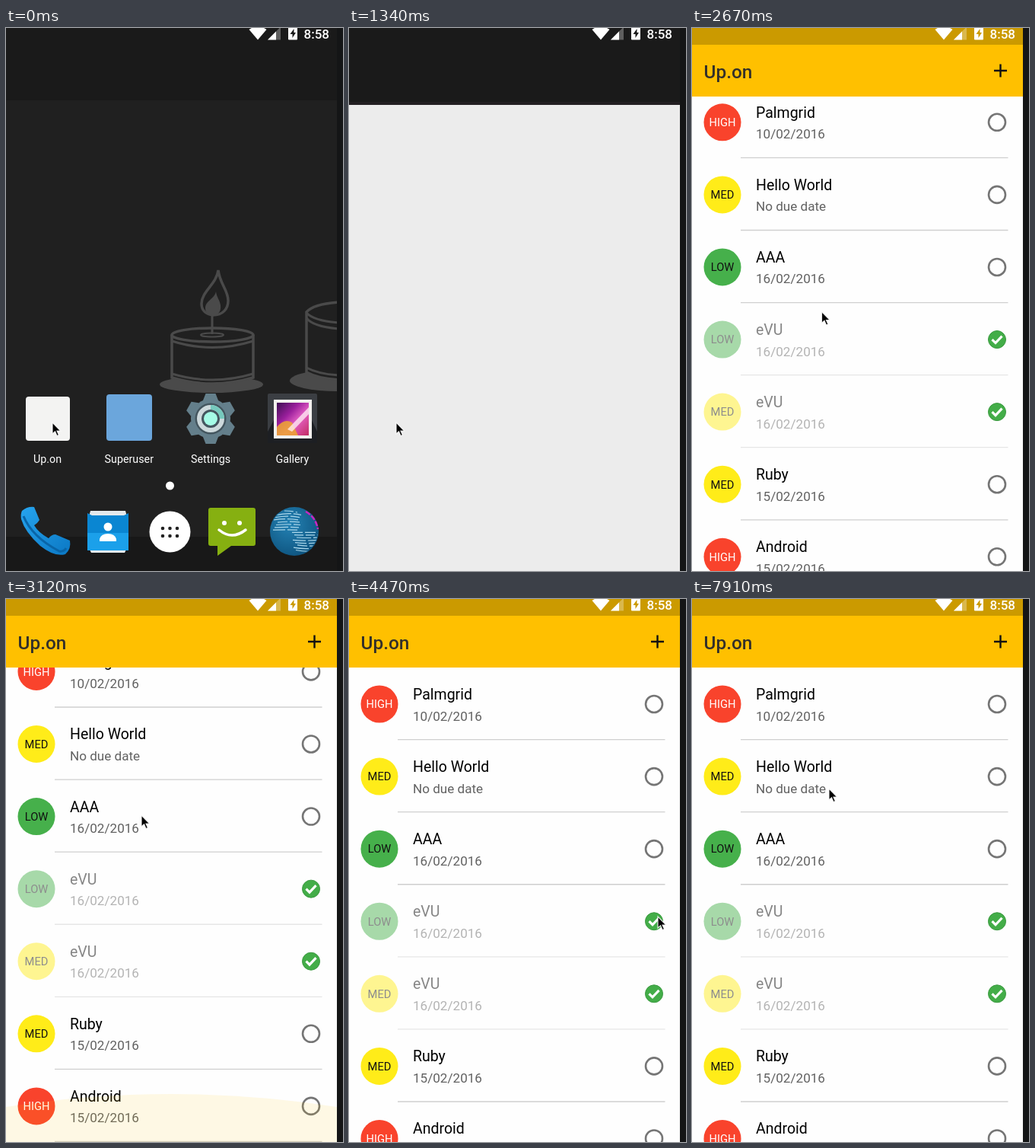
Recreate the animation shown at these times as an HTML page. Size 443 by 713 pixels, loop 8000 ms.

```html
<!DOCTYPE html>
<html lang="en">
<head>
<meta charset="utf-8">
<title>Task list</title>
<style>
html, body { margin: 0; width: 100%; height: 100%; overflow: hidden; background: #141516; }
svg { display: block; width: 443px; height: 713px; }
text { font-family: Roboto, sans-serif; }
</style>
</head>
<body>
<svg viewBox="0 0 443 713" xmlns="http://www.w3.org/2000/svg">
  <defs>
    <clipPath id="screen"><rect width="435" height="713"/></clipPath>
    <clipPath id="listClip"><rect y="90" width="435" height="623"/></clipPath>
    <clipPath id="globeClip"><circle cx="379" cy="661" r="31"/></clipPath>
    <linearGradient id="photo" x1="0" y1="0" x2="1" y2="1">
      <stop offset="0" stop-color="#3d0f52"/><stop offset=".35" stop-color="#9a1f9c"/>
      <stop offset=".6" stop-color="#e45fc4"/><stop offset="1" stop-color="#c22d63"/>
    </linearGradient>
    <linearGradient id="handset" x1="0" y1="0" x2="1" y2="1">
      <stop offset="0" stop-color="#26a4ee"/><stop offset="1" stop-color="#0b78c4"/>
    </linearGradient>
    <radialGradient id="globe" cx=".4" cy=".35" r=".7">
      <stop offset="0" stop-color="#2482b4"/><stop offset="1" stop-color="#0e547f"/>
    </radialGradient>
  </defs>

  <rect width="443" height="713" fill="#141516"/>
  <g clip-path="url(#screen)">
    <g id="home">
      <rect width="435" height="713" fill="#1a1a1a"/>
      <rect y="95" width="435" height="573" fill="#202020"/>
      <rect y="668" width="435" height="45" fill="#181818"/>
      <g fill="none" stroke="#4a4a4a" stroke-width="3.500">
        <ellipse cx="270" cy="468" rx="68" ry="11" fill="#4a4a4a" stroke="none"/>
        <path d="M218 403V459Q271 475 325 459V403" fill="#202020"/>
        <ellipse cx="271.500" cy="403" rx="53.500" ry="9" fill="#202020"/>
        <path d="M218 411Q271 428 325 411M218 454Q271 470 325 454" stroke-width="3"/>
        <ellipse cx="271" cy="403" rx="15" ry="2.500" stroke-width="2"/>
        <path d="M271 402V376" stroke-width="3"/>
        <path d="M279 318C277 336 257 346 257 362C257 371 263 376 272 377C285 377 292 369 292 358C292 344 281 336 279 318Z"/>
        <path d="M276 346C274 356 262 358 262 368C262 374 266 377 272 377C280 377 283 371 282 364C281 357 277 354 276 346Z" fill="#4a4a4a" stroke="none"/>
        <ellipse cx="436" cy="463" rx="63" ry="14" fill="#4a4a4a" stroke="none"/>
        <path d="M395 373V452Q412 461 440 462V360Q405 362 395 373Z" fill="#202020"/>
        <path d="M395 374Q405 385 440 387M395 381Q405 393 440 395M395 446Q412 455 440 456" stroke-width="3"/>
      </g>

      <rect x="26" y="484" width="58" height="58" rx="4" fill="#f3f3f2"/>
      <rect x="132" y="481" width="60" height="61" rx="4" fill="#6ba6dc"/>

      <g transform="translate(269 513)">
        <g id="gear" fill="#647f8b"><circle r="26"/></g>
        <circle r="20.500" fill="#44565f"/>
        <circle r="15" fill="none" stroke="#cdd9dc" stroke-width="6"/>
        <path d="M0 -15A15 15 0 0 1 15 0" fill="none" stroke="#76c9bd" stroke-width="6"/>
        <circle r="9" fill="#a5fbe6"/>
      </g>

      <rect x="344" y="480" width="65" height="65" rx="2" fill="#3b3e43"/>
      <path d="M344 545V530L352 515H402L409 530V545Z" fill="#1d1f23"/>
      <rect x="352" y="488" width="50" height="51" fill="#f3f1ee"/>
      <rect x="356" y="492" width="42" height="43" fill="url(#photo)"/>
      <path d="M356 535V524Q366 512 376 518L384 535Z" fill="#efa72f" opacity=".85"/>
      <path d="M370 527L398 498V507L376 530Z" fill="#fff0f6" opacity=".75"/>

      <g id="labels" fill="#fff" font-size="14.300" text-anchor="middle"></g>
      <circle cx="215.500" cy="601" r="5.500" fill="#fff"/>

      <path d="M21 634Q28 628 37 629L44 646Q41 651 37 653Q43 663 56 670Q60 665 65 665L84 673Q86 684 78 691Q64 695 45 680Q25 662 20 645Q19 638 21 634Z" fill="url(#handset)"/>
      <path d="M23 641Q34 668 70 687Q76 688 79 683" fill="none" stroke="#0965a8" stroke-width="3"/>

      <path d="M111 634H157L160 645H108Z" fill="#e4e9ec"/>
      <path d="M110 685H158L156 689H112Z" fill="#e4e9ec"/>
      <path d="M107 637L113 640H155L161 637V686H107Z" fill="#0a86d2"/>
      <path d="M107 663H161V686H107Z" fill="#1ba0ea"/>
      <circle cx="134" cy="655" r="5.500" fill="#fff"/>
      <path d="M123 674V671Q125 664 134 664Q143 664 145 671V674Z" fill="#fff"/>

      <circle cx="215.500" cy="661.500" r="27" fill="#fff"/>
      <g id="dots" fill="#222"></g>

      <path d="M269 630H325Q328 630 328 633V677Q328 680 325 680H296L278 693V680H269Q266 680 266 677V633Q266 630 269 630Z" fill="#86b011"/>
      <circle cx="287" cy="650" r="3" fill="#fff"/><circle cx="307" cy="650" r="3" fill="#fff"/>
      <path d="M280 659Q297 673 315 659" fill="none" stroke="#fff" stroke-width="3.500" stroke-linecap="round"/>

      <circle cx="379" cy="661" r="32" fill="url(#globe)"/>
      <g id="bands" clip-path="url(#globeClip)" fill="none" stroke="#a9d6ea" stroke-width="1.200"></g>
      <path d="M394 635Q407 642 410 658" fill="none" stroke="#c925c0" stroke-width="2.500" stroke-dasharray="7 2"/>
    </g>

    <g id="preview">
      <rect y="-100" width="435" height="190" fill="#1a1a1a"/>
      <rect y="86" width="435" height="4" fill="#231f22"/>
      <rect id="previewBody" y="90" width="435" height="640"/>
    </g>

    <g id="app">
      <rect width="435" height="713" fill="#fafafa"/>
      <rect id="panel" y="90" width="435" fill="#fefefe"/>
      <g id="list" clip-path="url(#listClip)"></g>
      <path id="glow" fill="#ffc107" opacity=".1"/>
      <rect width="435" height="22" fill="#cb9a00"/>
      <rect y="22" width="435" height="68" fill="#ffc000"/>
      <text id="title" x="15.500" y="65.500" font-size="24.400" font-weight="500" fill="#33302a"></text>
      <path d="M397 56H414M405.500 47.500V64.500" stroke="#111" stroke-width="2.400"/>
    </g>

    <g fill="#fff">
      <path d="M319.500 2Q331 -6 342.500 2L331 15.500Z"/>
      <path d="M344 15.500L361 -1.500V15.500Z" opacity=".3"/>
      <path d="M344 15.500L355 4.500V15.500Z"/>
      <rect x="371" y="-2" width="12" height="17.500" rx="1"/>
      <path id="bolt" d="M378.500 1L373.500 8H376.500V13L381 6H378.500Z"/>
      <text x="391.500" y="13.500" font-size="17" font-weight="500">8:58</text>
    </g>
  </g>

  <path id="cursor" d="M0 0V15L3.500 11.800L6 17.500L8.500 16.400L6 11H10.800Z" fill="#000" stroke="#fff" stroke-width="1.200" stroke-opacity=".85"/>
</svg>

<script>
const LOOP = 8000, PITCH = 95.08, DIM = 0.47, NAME = 'Up.on';
const $ = id => document.getElementById(id);
const clamp = v => Math.max(0, Math.min(1, v));
const show = (el, on) => el.setAttribute('display', on ? 'inline' : 'none');
const move = (el, x, y) => el.setAttribute('transform', `translate(${x} ${y})`);

const LEVELS = {
  HIGH: ['#f9432c', '#fff'],
  MED: ['#ffec19', '#111'],
  LOW: ['#46b04b', '#111']
};
const TASKS = [
  ['HIGH', 'Palmgrid', '10/02/2016'],
  ['MED', 'Hello World', 'No due date'],
  ['LOW', 'AAA', '16/02/2016'],
  ['LOW', 'eVU', '16/02/2016', true],
  ['MED', 'eVU', '16/02/2016', true],
  ['MED', 'Ruby', '15/02/2016'],
  ['HIGH', 'Android', '15/02/2016']
];

// Piecewise linear tracks: [time, ...values]
const CURSOR = [
  [0, 61, 518], [740, 62, 518], [1490, 62, 518], [1920, 150, 332], [2220, 165, 390],
  [2520, 168, 402], [3120, 178, 284], [3270, 178, 284], [3570, 186, 334], [3720, 188, 340],
  [3870, 210, 350], [4320, 417, 420], [4470, 406, 417], [4620, 400, 422], [6120, 400, 422],
  [6560, 400, 234], [7610, 400, 234], [7910, 180, 249]
];
const SCROLL = [[2520, 0], [2970, 42.6], [3270, 42.6], [3570, 0.9], [3720, 0]];
const GLOW = [[2820, 0], [3120, 63], [3270, 60], [3570, 30], [3720, 0]];

function track(keys, t) {
  const i = keys.findIndex(k => k[0] > t);
  if (i === 0) return keys[0].slice(1);
  if (i < 0) return keys[keys.length - 1].slice(1);
  const a = keys[i - 1], b = keys[i], p = (t - a[0]) / (b[0] - a[0]);
  return a.slice(1).map((v, n) => v + (b[n + 1] - v) * p);
}

function snap(t) {
  if (t < 1190) return t < 740 ? 0 : 740;
  const base = [6560, 1920, 1770, 1190].find(b => t >= b);
  return base + 150 * Math.floor((t - base) / 150);
}

// Opacity of the tick and whether the row is dimmed.
function checkState(i, t) {
  if (i === 3) {
    const off = t >= 4920 && t < 5820;
    const fade = t < 5220 ? 0.5 - (t - 4920) / 500 : 0;
    return [off ? fade : t === 5820 ? 0.5 : 1, !off];
  }
  if (i === 1) {
    const on = t >= 6860 && t < 7610;
    return [t === 6860 || t === 7610 ? 0.5 : on ? 1 : 0, on];
  }
  return TASKS[i][3] ? [1, true] : [0, false];
}

function build() {
  $('title').textContent = NAME;
  $('labels').innerHTML = [NAME, 'Superuser', 'Settings', 'Gallery']
    .map((s, i) => `<text x="${54.5 + i * 107.3}" y="571">${s}</text>`).join('');
  for (let i = 0; i < 6; i++) {
    $('gear').innerHTML += `<path d="M-10 -24L-6.500 -33H6.500L10 -24Z" transform="rotate(${i * 60})"/>`;
    $('dots').innerHTML += `<circle cx="${206 + i % 3 * 9.5}" cy="${i < 3 ? 657 : 667}" r="2.300"/>`;
  }
  // Land masses: left side of the upper half, right side of the lower half.
  for (let i = 0; i < 16; i++) {
    const y = 636 + i * 3.3, x = i < 8 ? 351 + i * 5 % 7 : 376 + i * 3 % 8;
    $('bands').innerHTML += `<path d="M${x} ${y}q16 ${(i - 8) * 0.5} 32 0" stroke-dasharray="${12 + i * 7 % 9} 3"/>`;
  }
  $('list').innerHTML = TASKS.map(([level, name, due, done]) => {
    const [fill, ink] = LEVELS[level];
    return `<g>
      <g><circle cx="40" r="24.500" fill="${fill}"/>
        <text x="40" y="5.300" font-size="14.700" text-anchor="middle" fill="${ink}">${level}</text>
        <text x="84" y="-6" font-size="19.500" fill="#000">${name}</text>
        <text x="84" y="21.500" font-size="17.100" fill="#616161">${due}</text></g>
      <circle cx="401" r="11" fill="none" stroke="#757575" stroke-width="2.600"/>
      <g><circle cx="401" r="11.500" fill="#43ad48" stroke="#3b9a40"/>
        <path d="M394.500 0L399 4.500L407.500 -4.500" fill="none" stroke="#fff" stroke-width="3.200"/></g>
      <path d="M64 46.600H415.500" stroke="#cfcfcf" stroke-width="1.300" opacity="${done ? 0.5 : 1}"/>
    </g>`;
  }).join('');
}

function drawRows(t) {
  const [scroll] = track(SCROLL, t);
  [...$('list').children].forEach((row, i) => {
    const p = clamp(0.6 - 0.32 * (i - 2) + (t - 1920) / 300);
    const [tick, dim] = checkState(i, t);
    const [info, ring, mark] = row.children;
    move(row, 0, 138 + i * PITCH - scroll + 70 * (1 - p) ** 5);
    row.setAttribute('opacity', p);
    info.setAttribute('opacity', dim ? DIM : 1);
    mark.setAttribute('opacity', tick);
    show(ring, tick === 0);
  });
}

function drawGlow(h) {
  const mid = 713 - h, bend = 5 + 0.19 * h;
  $('glow').setAttribute('d', `M0 713V${mid + bend}Q217 ${mid - bend} 435 ${mid + bend}V713Z`);
  show($('glow'), h > 0);
}

function draw(time) {
  const t = snap(time);
  const inApp = t >= 1640;
  show($('home'), t < 1340);
  show($('preview'), t >= 1190 && !inApp);
  show($('app'), inApp);
  $('bolt').setAttribute('fill', inApp ? '#cb9a00' : '#1a1a1a');

  $('preview').setAttribute('opacity', t < 1340 ? 0.5 : 1);
  move($('preview'), 0, t < 1340 ? 34 : t < 1490 ? 11 : 0);
  $('previewBody').setAttribute('fill', t < 1490 ? '#ececec' : '#fafafa');

  if (inApp) {
    $('panel').setAttribute('height', 623 * clamp((t - 1640) / 386));
    drawRows(t);
    drawGlow(track(GLOW, t)[0]);
  }
  move($('cursor'), ...track(CURSOR, t));
}

build();
const start = performance.now();
function tick(now) {
  draw(Math.max(0, now - start) % LOOP);
  requestAnimationFrame(tick);
}
draw(0);
requestAnimationFrame(tick);
</script>
</body>
</html>
```
